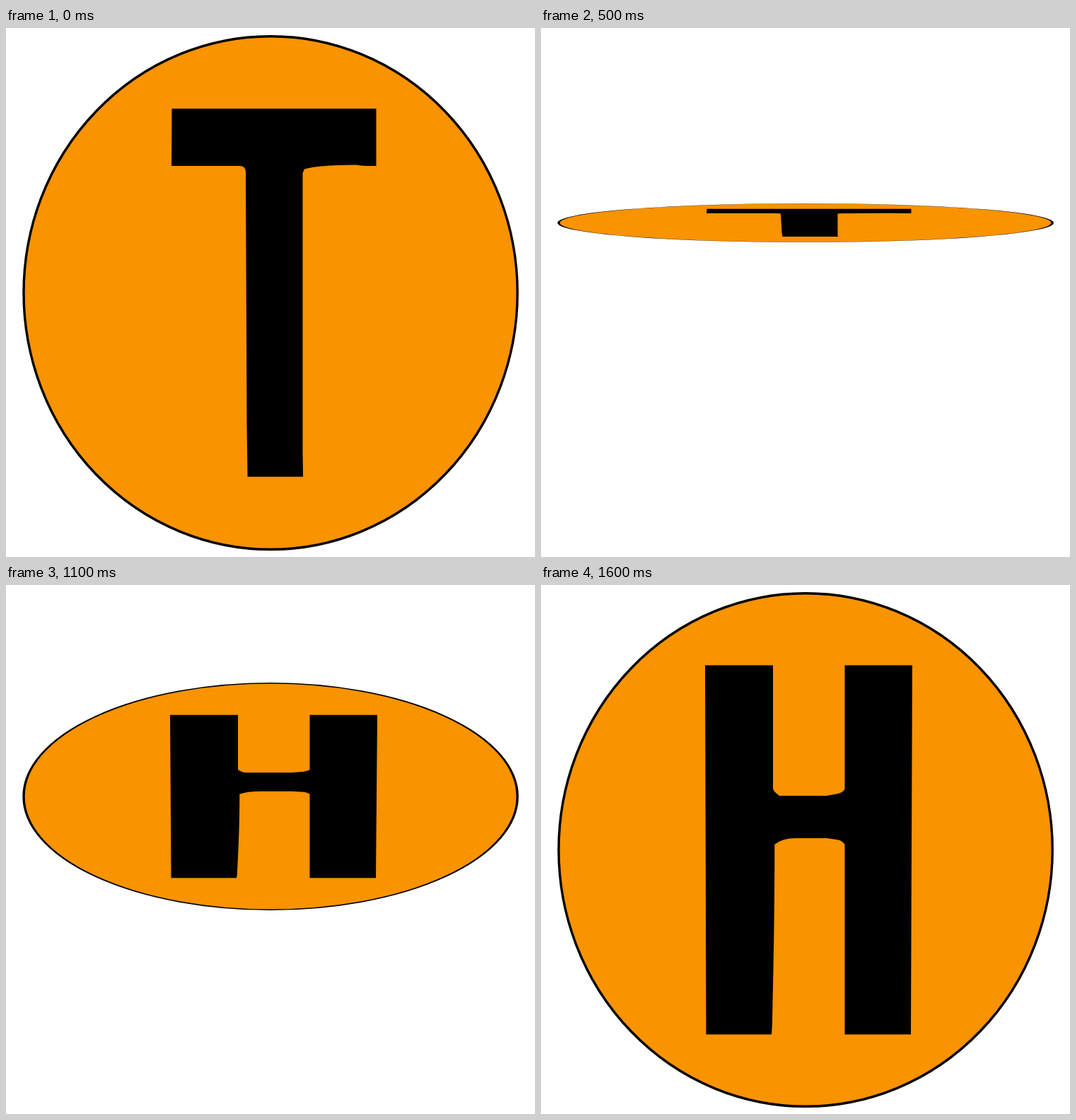
Animation of 748 by 748 pixels, one loop 1.7 s. Source, as an HTML page with a canvas:

```html
<!DOCTYPE html>
<html lang="en">
<head>
<meta charset="utf-8">
<title>Flipping disc</title>
<style>
html, body { margin: 0; width: 100%; height: 100%; overflow: hidden; background: #fff; }
canvas { display: block; }
</style>
</head>
<body>
<canvas id="stage" width="748" height="748"></canvas>
<script>
const ctx = document.getElementById('stage').getContext('2d');
const STEP = 100;
const STEPS = 17;
const FLIP_STEP = 7;
const FULL_HEIGHT = 729;
const CENTER = { x: 374.1, y: 374.5 };
const RADIUS = { x: 349.1, y: 362.8 };

const letterT = new Path2D(`M234.5 114H523.5V195H510Q501 194.7 495 193.5
  Q440 194 422 199.5L419.5 205V600L420 634.5H341.5L340.5 560L339 204
  Q339 195 330 195H234Z`);
const letterH = new Path2D(`M232 113.5H328V288Q329 292 337 298H404L420 295
  Q428 293 429.5 288V113.5H525L523 635.5H429.5V367Q426 361 418 360L404 358H360
  Q341 358 330.3 367C330.3 480 328 570 327 620L326 635.5H233.5Z`);

// The disc closes with a steadily growing speed.
function closingPose(step) {
  return {
    middle: CENTER.y - 29.6 * step + 1.96 * step ** 2,
    height: Math.max(10, FULL_HEIGHT - 73 * step - 12.36 * step ** 2),
    shift: 0
  };
}

// It opens again along a few key poses.
const openingKeys = [
  { step: 7, middle: 291, height: 14, shift: 0 },
  { step: 9, middle: 295.5, height: 157, shift: -2 },
  { step: 11, middle: 299, height: 322, shift: 0 },
  { step: 12, middle: 309.5, height: 419, shift: -3.3 },
  { step: 13, middle: 308.7, height: 517.5, shift: -3.3 },
  { step: 16, middle: CENTER.y, height: FULL_HEIGHT, shift: 0 }
];

function openingPose(step) {
  const next = Math.max(1, openingKeys.findIndex(key => key.step >= step));
  const from = openingKeys[next - 1];
  const to = openingKeys[next];
  const part = (step - from.step) / (to.step - from.step);
  const mix = name => from[name] + (to[name] - from[name]) * part;
  return { middle: mix('middle'), height: mix('height'), shift: mix('shift') };
}

function drawDisc(letter, { middle, height, shift }) {
  ctx.fillStyle = '#fff';
  ctx.fillRect(0, 0, 748, 748);
  ctx.save();
  ctx.translate(shift, middle);
  ctx.scale(1, height / FULL_HEIGHT);
  ctx.translate(0, -CENTER.y);
  ctx.beginPath();
  ctx.ellipse(CENTER.x, CENTER.y, RADIUS.x, RADIUS.y, 0, 0, Math.PI * 2);
  ctx.fillStyle = '#f99300';
  ctx.fill();
  ctx.lineWidth = 3.4;
  ctx.strokeStyle = '#000';
  ctx.stroke();
  ctx.fillStyle = '#000';
  ctx.fill(letter);
  ctx.restore();
}

const start = performance.now();
function tick() {
  const step = Math.floor((performance.now() - start) / STEP) % STEPS;
  if (step < FLIP_STEP) drawDisc(letterT, closingPose(step));
  else drawDisc(letterH, openingPose(step));
  requestAnimationFrame(tick);
}
tick();
</script>
</body>
</html>
```
